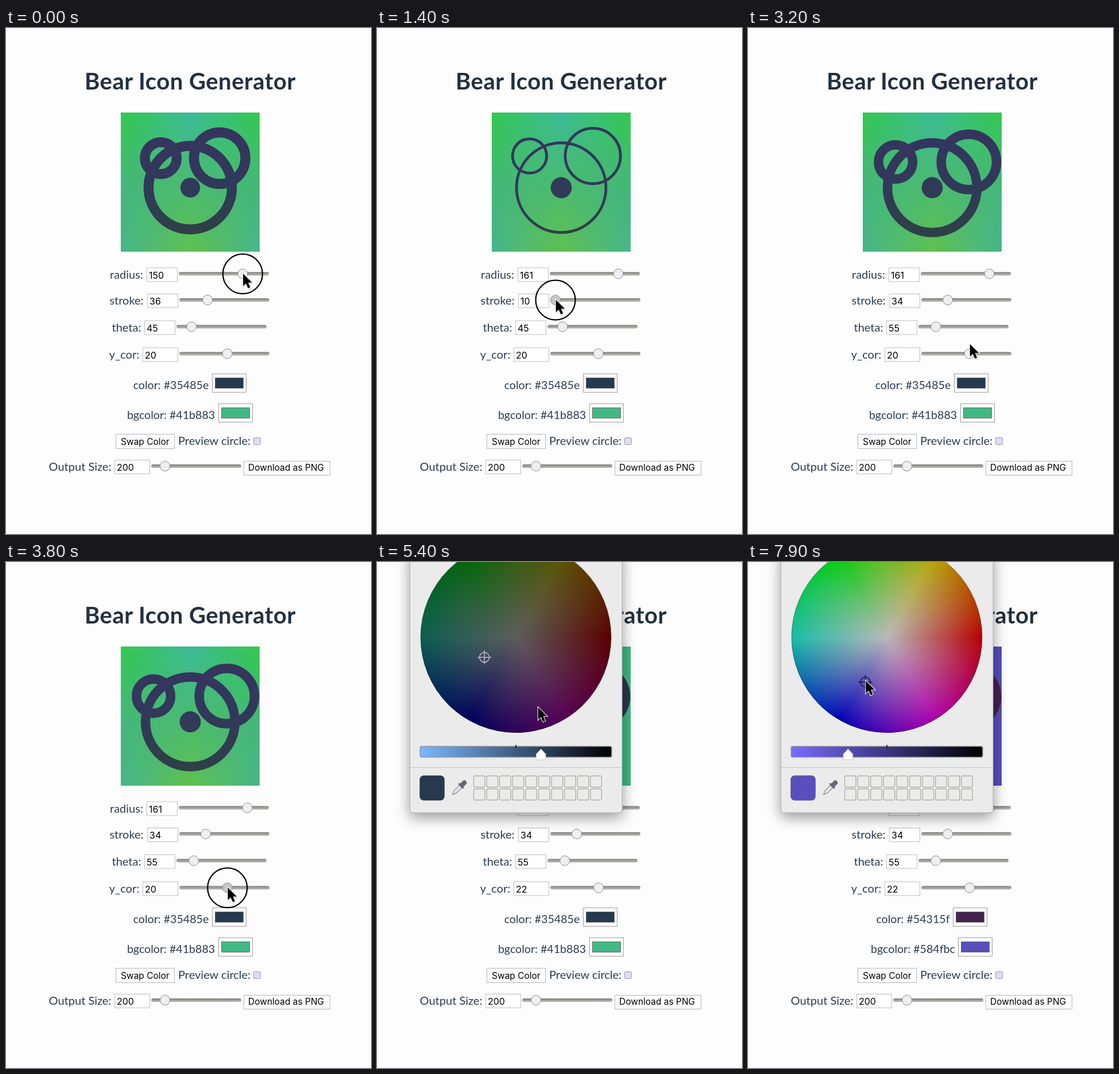
Recreate the animation shown at these times as an HTML page. Size 636x880 px, loop 8000 ms.

```html
<!DOCTYPE html>
<html lang="en">
<head>
<meta charset="utf-8">
<title>Bear Icon Generator</title>
<style>
  html, body { margin: 0; width: 100%; height: 100%; overflow: hidden; background: #fdfdfd; }
  svg { display: block; width: 636px; height: 880px; }
  text { font: 20px Lato, sans-serif; fill: #2c3e50; }
  .title { font-size: 40px; font-weight: 700; letter-spacing: .5px; fill: #22303f; }
  .hex { font-size: 19.6px; }
  .value { font: 16px Inter, sans-serif; fill: #000; }
  .button { font: 15.5px Inter, sans-serif; fill: #000; }
  .wheel { width: 332px; height: 332px; border-radius: 50%;
    background: radial-gradient(circle closest-side, #e6e6e6, #e6e6e600),
      conic-gradient(from 90deg, #e40000, #d800d8, #0000e4, #1cecd0, #00ff08, #e0d000, #e40000); }
  .panel { filter: drop-shadow(0 8px 12px #0006); }
</style>
</head>
<body>
<svg id="stage" viewBox="0 0 636 880"></svg>
<script>
const LOOP = 8000, STEP = 100, PICKER_OPENS = 5000, PICKER_SWITCHES = 7400;
const stage = document.getElementById('stage');
const ruler = document.createElement('canvas').getContext('2d');

const ease = p => p * p * (3 - 2 * p);
const clamp = p => Math.min(1, Math.max(0, p));
const mix = (a, b, k) => Array.isArray(a) ? a.map((v, i) => mix(v, b[i], k)) : a + (b - a) * k;
const hex = rgb => '#' + rgb.map(c => Math.round(c).toString(16).padStart(2, '0')).join('');
const dim = (rgb, amount) => rgb.map(c => Math.max(0, c - amount));

const rect = (x, y, w, h, fill, extra = '') =>
  `<rect x="${x}" y="${y}" width="${w}" height="${h}" fill="${fill}" ${extra}/>`;
const circle = (x, y, r, extra = '') => `<circle cx="${x}" cy="${y}" r="${r}" ${extra}/>`;
const text = (x, y, s, cls = '') => `<text x="${x}" y="${y}" class="${cls}">${s}</text>`;
const box = (x, y, w, h, line = '#bdbdc6') => rect(x + .5, y + .5, w, h, '#fff', `stroke="${line}"`);

function textWidth(s, size) {
  ruler.font = `${size}px Lato, sans-serif`;
  return ruler.measureText(s).width;
}

// Each row is one centred line: label, number box, slider, optional tail
const TRACK = 157;
function row(label, y, boxW, min, max, tail = 0) {
  const labelW = textWidth(label, 20);
  const labelX = 319.5 - (labelW + boxW + TRACK + tail + 9) / 2;
  const boxX = Math.round(labelX + labelW + 6);
  return { label, y, boxW, min, max, labelX, boxX, trackX: boxX + boxW + 3 };
}
const rows = {
  radius: row('radius:', 427.5, 53, 10, 200),
  stroke: row('stroke:', 473, 53, 10, 100),
  theta: row('theta:', 519.5, 53, 0, 360),
  yCor: row('y_cor:', 566.5, 61, -270, 270),
  size: row('Output Size:', 762, 61, 0, 1850, 154)
};
const thumbX = (r, value) => r.trackX + 9 + (value - r.min) / (r.max - r.min) * (TRACK - 18);

// Hue is the angle and saturation the distance on the colour wheel
function wheelPoint([r, g, b]) {
  const angle = Math.atan2(Math.sqrt(3) / 2 * (g - b), r - (g + b) / 2);
  const reach = 149 * (1 - Math.min(r, g, b) / Math.max(r, g, b));
  return [242 + Math.cos(angle) * reach, 131 - Math.sin(angle) * reach];
}

const initial = { radius: 150, stroke: 36, theta: 45, yCor: 20, size: 200,
  ink: [53, 72, 94], paper: [65, 184, 131] };
const drag = (start, end, part, to, from) => ({ start, end, part, to, from, held: true });
const click = (start, end, ...spot) => ({ start, end, spot, held: true });
const pass = (at, ...spot) => ({ start: at, end: at, spot });
const gestures = [
  drag(0, 400, 'radius', 161),
  drag(800, 1400, 'stroke', 10),
  drag(1400, 2100, 'stroke', 34),
  drag(2500, 2900, 'theta', 55),
  pass(3200, 386, 549),
  drag(3500, 4500, 'yCor', 22),
  click(4800, 5000, 388, 616),
  pass(5400, 280, 252),
  drag(5700, 6500, 'ink', [84, 49, 95], [82, 24, 94]),
  pass(7000, 155, 289),
  click(7300, 7400, 400, 668),
  drag(7700, 7900, 'paper', [88, 79, 188], [84, 82, 188])
];

function valueOf(part, t) {
  return gestures.filter(g => g.part === part && g.start <= t).reduce(
    (v, g) => mix(g.from ?? v, g.to, ease(clamp((t - g.start) / (g.end - g.start)))), initial[part]);
}

function place(g, t) {
  if (g.spot) return g.spot;
  const value = valueOf(g.part, t), r = rows[g.part];
  if (r) return [thumbX(r, value), r.y - 1];
  const [x, y] = wheelPoint(value);
  return [x, y - 3];
}

function cursorAt(t) {
  const i = gestures.findLastIndex(g => g.start <= t);
  const g = gestures[i], next = gestures[i + 1];
  if (t <= g.end || !next) return place(g, t);
  return mix(place(g, g.end), place(next, next.start), ease((t - g.end) / (next.start - g.end)));
}

const fade = (id, dir, ...colors) => `<linearGradient id="${id}" ${dir}>` +
  colors.map((c, i) => `<stop offset="${i / (colors.length - 1)}" stop-color="${c}"/>`).join('') +
  '</linearGradient>';
const down = 'x1="0" y1="0" x2="0" y2="1"';
const defs = '<defs>' +
  fade('groove', down, '#757575', '#a5a5a0', '#b4b4ac') +
  fade('sides', down, '#34c94e', '#44b878', '#46b68c') +
  fade('middle', down, '#3cba98', '#4aba70', '#60c04e') +
  fade('spread', '', '#000', '#fff', '#000') +
  fade('inkFill', 'gradientUnits="userSpaceOnUse" x1="0" y1="175" x2="0" y2="360"',
    '#36345f', '#31395a', '#2f4047') +
  '<mask id="centre">' + rect(200, 147, 242, 242, 'url(#spread)') + '</mask>' +
  '<clipPath id="iconClip"><path d="M200 147h242v242h-242z"/></clipPath></defs>';

function icon(s) {
  const unit = 242 / 500, r = s.radius * unit, a = s.theta * Math.PI / 180;
  const x = 321, y = 268 + s.yCor * unit;
  const dx = r * Math.sin(a), dy = r * Math.cos(a);
  const ink = s.panel ? s.inkShown : 'url(#inkFill)';
  const ring = `fill="none" stroke="${ink}" stroke-width="${s.stroke * unit}"`;
  const ground = s.panel ? rect(200, 147, 242, 242, s.paperShown)
    : rect(200, 147, 242, 242, 'url(#sides)') + rect(200, 147, 242, 242, 'url(#middle)', 'mask="url(#centre)"');
  return '<g clip-path="url(#iconClip)">' + ground +
    circle(x, y, r, ring) +
    circle(x - dx, y - dy, r * .382, ring) +
    circle(x + dx, y - dy, r * .618, ring) +
    circle(x, y, r * .236, `fill="${ink}"`) + '</g>';
}

function numberRow(part, s) {
  const { label, y, labelX, boxX, boxW, trackX } = rows[part];
  const thumb = s.heldPart === part ? '#c6c6c8' : '#efeff2';
  return text(labelX, y + 8, label) + box(boxX, y - 11, boxW, 24) +
    text(boxX + 4, y + 8, Math.round(s[part]), 'value') +
    rect(trackX, y - 3, TRACK, 6, 'url(#groove)', 'rx="3"') +
    circle(thumbX(rows[part], s[part]), y, 8.5, `fill="${thumb}" stroke="#8c8c90"`);
}

function colorRow(label, y, rgb, shown, focused) {
  const line = `${label}: ${hex(rgb)}`;
  const w = textWidth(line, 19.6);
  const x = 320.5 - (w + 66) / 2, boxX = Math.round(x + w + 5.5);
  return text(x, y + 8.5, line, 'hex') + box(boxX, y - 18, 59, 32, '#9c9ca2') +
    rect(boxX + 5.5, y - 10.5, 49, 18, shown, 'stroke="#6c6c70"') +
    (focused ? rect(boxX - 1, y - 19, 62, 33, 'none', 'rx="2" stroke="#6c9be6" stroke-width="4.5"') : '');
}

function form(s, t) {
  return text(137, 107, 'Bear Icon Generator', 'title') + icon(s) +
    Object.keys(rows).map(part => numberRow(part, s)).join('') +
    colorRow('color', 619, s.ink, s.inkShown, t >= 5700 && t < PICKER_SWITCHES) +
    colorRow('bgcolor', 671, s.paper, s.paperShown) +
    box(191, 706, 102, 25, '#b4b4c2') + text(200, 725, 'Swap Color', 'button') +
    text(300, 725, 'Preview circle:') +
    rect(431.5, 712.5, 12, 12, '#dedeee', 'rx="2" stroke="#9494b4"') +
    box(414, 753, 150, 24, '#b4b4c2') + text(422, 770, 'Download as PNG', 'button');
}

function picker(s, t) {
  const [rgb, shown] = t < PICKER_SWITCHES ? [s.ink, s.inkShown] : [s.paper, s.paperShown];
  const level = Math.max(...rgb) / 255;
  const tone = t < PICKER_SWITCHES ? dim(rgb, 15) : rgb;
  const bright = hex(tone.map(c => c / Math.max(...tone) * 255));
  const knob = 95 + (1 - level) * 302;
  const [mx, my] = wheelPoint(rgb);
  let cells = '';
  for (let i = 0; i < 20; i++)
    cells += rect(168.5 + i % 10 * 22.6, 372 + Math.floor(i / 10) * 22.5, 19.5, 19.5, 'none',
      'rx="2.5" stroke="#adada8" stroke-width="1.3"');
  return '<defs>' + fade('levels', '', bright, '#000') + '</defs>' +
    rect(57.5, -20, 369.5, 456, '#ebebeb', 'rx="5" stroke="#b4b4b8" class="panel"') +
    `<foreignObject x="76" y="-35.5" width="332" height="332">
      <div xmlns="http://www.w3.org/1999/xhtml" class="wheel" style="filter:brightness(${level * 1.09})"></div>
    </foreignObject>` +
    circle(242, 130.5, 166, 'fill="none" stroke="#0006"') +
    `<g fill="none" stroke="${level > .5 ? '#10143c' : '#c2b8c8'}" stroke-width="1.5">
      ${circle(mx, my, 8.5)}<path d="M${mx - 12} ${my}h24M${mx} ${my - 12}v24"/></g>` +
    rect(75, 320.5, 334, 19, 'url(#levels)', 'rx="3" stroke="#9a9aa0" stroke-width="1.5"') +
    '<path d="M242 318v5" stroke="#000" stroke-width="1.5"/>' +
    `<path d="M${knob} 325l8.5 9v8q0 2-2 2h-13q-2 0-2-2v-8z" fill="#fff" stroke="#aaa" stroke-width=".6"/>` +
    '<path d="M58 357.5H427" stroke="#c6c6c8"/>' +
    rect(74.5, 371.5, 43, 43, shown, 'rx="7" stroke="#0004"') +
    `<g transform="translate(143 393) rotate(45)">
      <path d="M-3-4V9L0 16L3 9V-4Z" fill="#e4e4ea" stroke="#77777c"/>
      ${rect(-4, -17, 8, 12, '#666678', 'rx="4"')}${rect(-6, -7, 12, 3.5, '#666678', 'rx="1.5"')}</g>` + cells;
}

function pointer([x, y], pressed) {
  const ring = pressed ? circle(x, y + 1.2, 34.5, 'fill="none" stroke="#000" stroke-width="2.2"') : '';
  const arrow = 'M0 0V23.5L5.4 18.6L9.4 27.5L13.6 25.7L9.7 17H17Z';
  return ring + `<g transform="translate(${x + .7} ${y + .7}) scale(.92)">
    <path d="${arrow}" transform="translate(1.5 2.5)" fill="#0003"/>
    <path d="${arrow}" stroke="#fff" stroke-width="2.2" paint-order="stroke"/></g>`;
}

function render(t) {
  const s = {};
  for (const part in initial) s[part] = valueOf(part, t);
  const held = gestures.find(g => g.held && t >= g.start && t < g.end);
  s.heldPart = t > 0 && held?.part;
  s.panel = t >= PICKER_OPENS;
  s.inkShown = hex(dim(s.ink, 15));
  s.paperShown = hex(s.paper);
  stage.innerHTML = defs + rect(0, 0, 636, 880, '#fdfdfd') + form(s, t) +
    (s.panel ? picker(s, t) : '') + pointer(cursorAt(t), held);
}

let last = -1;
const start = performance.now();
function tick() {
  const t = Math.floor((performance.now() - start) % LOOP / STEP) * STEP;
  if (t !== last) render(last = t);
  requestAnimationFrame(tick);
}
tick();
</script>
</body>
</html>
```
